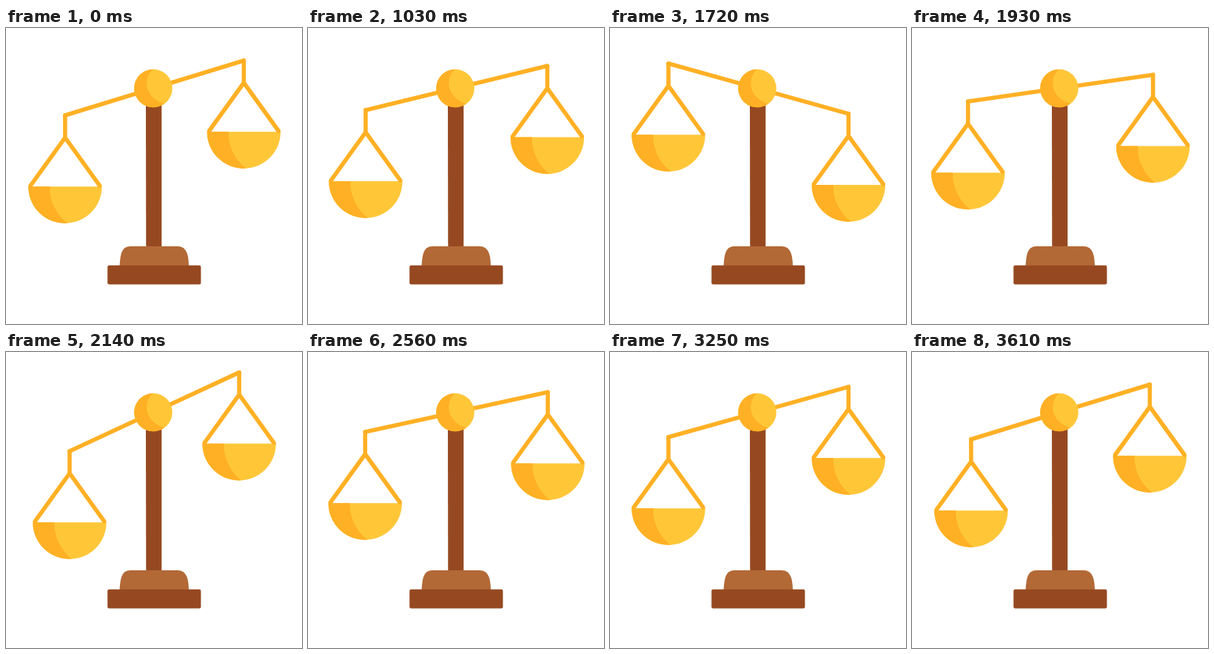
Animation of 400 by 400 pixels, one loop 3.64 s. Source, as an HTML page:

```html
<!DOCTYPE html>
<html lang="en">
<head>
<meta charset="utf-8">
<title>Balance scales</title>
<style>
  html, body { margin: 0; width: 100%; height: 100%; overflow: hidden; background: #fff; }
  svg { display: block; width: 100%; height: 100%; }
  .gold { fill: #ffc738; }
  .amber { fill: #ffb024; }
  .wood { fill: #964921; }
  .line { fill: none; stroke: #ffb024; stroke-width: 5.6; stroke-linecap: round; stroke-linejoin: round; }
</style>
</head>
<body>
<svg viewBox="0 0 400 400">
  <defs>
    <g id="pan">
      <path class="gold" d="M-49.7 96.2H49.7A49.7 49.7 0 0 1-49.7 96.2Z"/>
      <path class="amber" d="M-49.7 96.2H-20.5C-21.5 115 -12 134 3 145.8A49.7 49.7 0 0 1-49.7 96.2Z"/>
      <path class="line" d="M0 0V30M-46.8 95L0 30L46.8 95"/>
    </g>
  </defs>

  <path class="wood" d="M189 95H210.3V300H189.3Z"/>
  <path fill="#b26936" d="M153.5 322C154 314 154.5 309 156 304Q159 295 168 295H232Q241 295 244.5 304C246.3 309 246.8 314 247 322Z"/>
  <rect class="wood" x="137.2" y="320.7" width="126.2" height="25.7" rx="2.2"/>

  <path id="beam" class="line" d="M-124.6 0H128"/>
  <use id="left" href="#pan"/>
  <use id="right" href="#pan"/>

  <circle class="gold" cx="199" cy="81.5" r="25.8"/>
  <path class="amber" d="M199 55.7C186 66 185 93 214 102.5A25.8 25.8 0 1 1 199 55.7Z"/>
</svg>
<script>
  const LOOP = 3640, HOLD = 1000, STEP = 30;
  const PIVOT = { x: 199, y: 81.5 };
  const ARMS = { left: -124.6, right: 128 };

  // Turning points of the swing: [step, degrees], right side up is positive
  const SWING = [[0, 17.04], [19.7, -21], [39, 25.2], [54, 11.7], [65.5, 19], [77, 15.3], [87, 17.04]];

  const el = id => document.getElementById(id);
  const easeOut = u => 1 - Math.pow(1 - u, 1.79);
  const easeInOut = u => (1 - Math.cos(Math.PI * u)) / 2;

  function angleAt(n) {
    const i = Math.max(1, SWING.findIndex(([at]) => at >= n));
    const [n0, a0] = SWING[i - 1], [n1, a1] = SWING[i];
    const ease = i === 1 ? easeOut : easeInOut;
    return a0 + (a1 - a0) * ease((n - n0) / (n1 - n0));
  }

  function draw(ms) {
    // The swing advances in discrete 30 ms steps
    const n = Math.max(0, Math.floor((ms % LOOP - HOLD) / STEP));
    const deg = angleAt(n), rad = deg * Math.PI / 180;
    el("beam").setAttribute("transform", `translate(${PIVOT.x} ${PIVOT.y}) rotate(${-deg})`);
    for (const side in ARMS) {
      const x = PIVOT.x + ARMS[side] * Math.cos(rad);
      const y = PIVOT.y - ARMS[side] * Math.sin(rad);
      el(side).setAttribute("transform", `translate(${x} ${y})`);
    }
  }

  const start = performance.now();
  function tick() {
    draw(performance.now() - start);
    requestAnimationFrame(tick);
  }
  tick();
</script>
</body>
</html>
```
